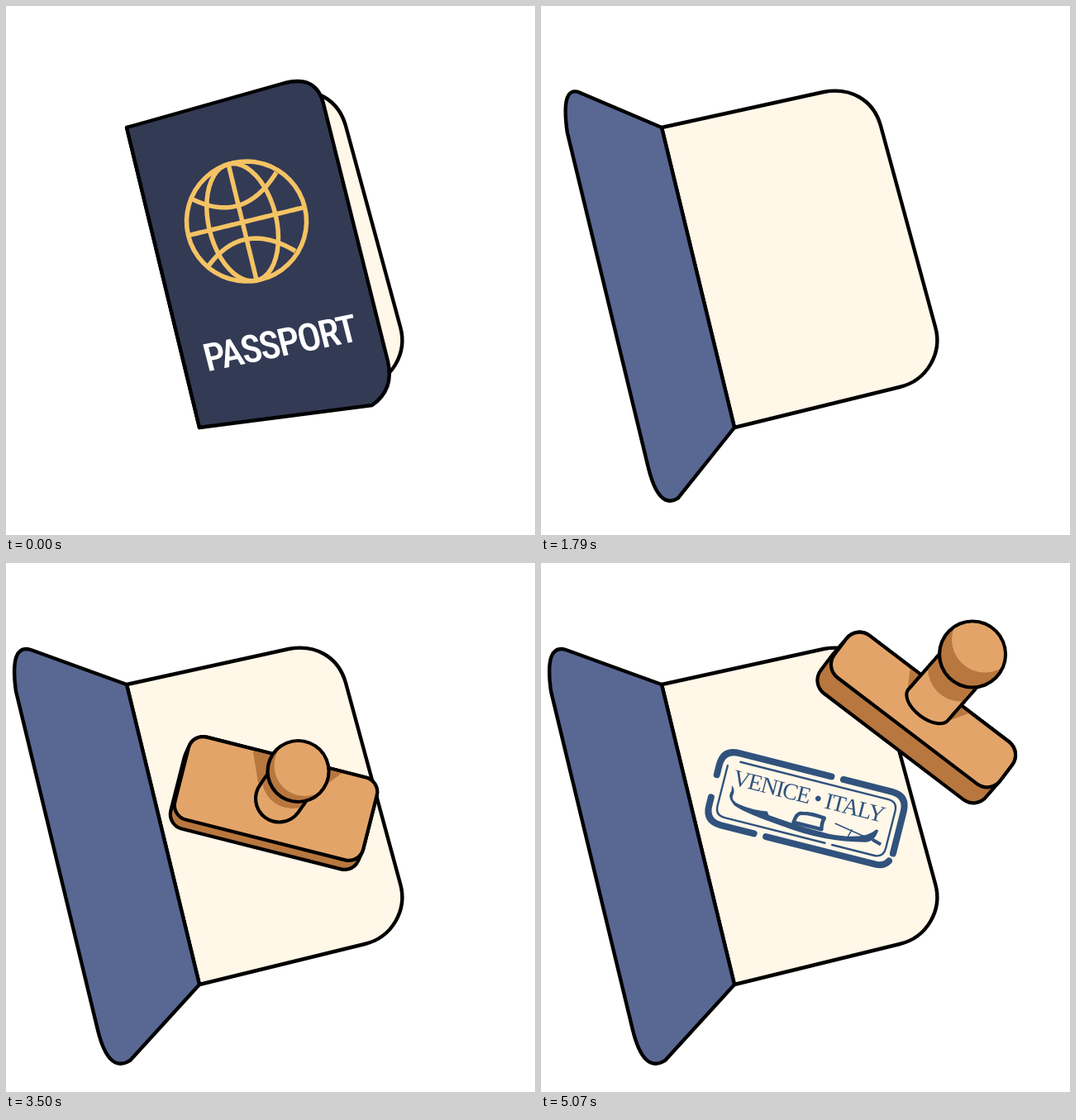
Write an HTML page with a canvas that moves like this. It is 640x640 px and loops after 7.21 s.

```html
<!DOCTYPE html>
<html lang="en">
<head>
<meta charset="utf-8">
<title>Passport stamp</title>
<style>
  html, body { margin: 0; width: 100%; height: 100%; overflow: hidden; background: #fff; }
  canvas { display: block; width: 100vw; height: 100vh; }
</style>
</head>
<body>
<canvas id="stage" width="640" height="640"></canvas>
<script>
const LOOP = 7210, FPS = 14;
const NAVY = '#333a54', INSIDE = '#596793', PAPER = '#fff7e8', GOLD = '#f4c363';
const WOOD = '#e3a469', SHADE = '#b8773e', INK = '#30527d';

const ctx = document.getElementById('stage').getContext('2d');
const layer = document.createElement('canvas');
layer.width = layer.height = 640;
const sc = layer.getContext('2d');

const mix = (a, b, k) => a + (b - a) * k;
const mix2 = (a, b, k) => [mix(a[0], b[0], k), mix(a[1], b[1], k)];
const unit = x => Math.min(1, Math.max(0, x));

function fill(c, path, color) {
  c.fillStyle = color;
  c.fill(path);
}

function clipped(c, path, draw) {
  c.save();
  c.clip(path);
  draw();
  c.restore();
}

// ---- Passport ----

const page = new Path2D('M146 147L342 104C374 98 402 113 411 145L477 388C486 420 467 453 434 461L234 510Z');

// Cover outline points, shut and open
const SHUT = [[334, 94], [375, 82], [384, 118], [462, 430], [470, 464], [443, 483]];
const OPEN = [[30, 105], [4, 97], [12, 155], [111, 565], [124, 618], [150, 602]];

function coverPath(p) {
  const [a, b, c, d, e, f] = SHUT.map((s, i) => mix2(s, OPEN[i], p));
  const path = new Path2D();
  path.moveTo(146, 147);
  path.lineTo(...a);
  path.quadraticCurveTo(...b, ...c);
  path.lineTo(...d);
  path.quadraticCurveTo(...e, ...f);
  path.lineTo(234, 510);
  path.closePath();
  return path;
}

// Carries a point of the shut cover along with the turning cover
function turn(x, y, p) {
  const dx = x - 146, dy = y - 147, len = 373.5;
  const v = (dx * 88 + dy * 363) / (len * len);
  const u = (dx * 363 - dy * 88) / len / 240;
  return [x + p * u * mix(-372, -348, v), y + p * u * mix(22, 145, v)];
}

function globeCurve(p, from, to, fn) {
  ctx.beginPath();
  for (let i = 0; i <= 48; i++) {
    const [x, y] = fn(mix(from, to, i / 48));
    ctx.lineTo(...turn(291 + x * 0.972 + y * 0.236, 260.5 - x * 0.236 + y * 0.972, p));
  }
  ctx.stroke();
}

function drawGlobe(p) {
  const R = 72.5, axis = -5;
  ctx.strokeStyle = GOLD;
  ctx.lineWidth = 5.5 - 4 * p;
  globeCurve(p, 0, 2 * Math.PI, a => [R * Math.cos(a), R * Math.sin(a)]);
  globeCurve(p, 0, 2 * Math.PI, a => [axis + 41 * Math.cos(a), R * Math.sin(a)]);
  globeCurve(p, -R, R, x => [x, 0]);
  globeCurve(p, -R, R, y => [axis, y]);
  for (const s of [-1, 1]) {
    globeCurve(p, -1, 1, x => [axis + 54 * x, s * (21 + 3 * x + 25 * x * x)]);
  }
}

function drawTitle(p) {
  const o = turn(331, 407.5, p);
  const ex = turn(331.98, 407.3, p), ey = turn(331.246, 408.47, p);
  const font = size => `500 extra-condensed ${size}px "Roboto Condensed", "Open Sans Condensed", Roboto, sans-serif`;
  ctx.save();
  ctx.transform(ex[0] - o[0], ex[1] - o[1], ey[0] - o[0], ey[1] - o[1], ...o);
  ctx.letterSpacing = '-2px';
  ctx.font = font(50);
  const size = Math.min(57, 50 * 188 / ctx.measureText('PASSPORT').width);
  ctx.font = font(size);
  ctx.textAlign = 'center';
  ctx.fillStyle = '#fff';
  ctx.fillText('PASSPORT', 0, size * 0.355);
  ctx.restore();
}

function outline(path, color) {
  fill(ctx, path, color);
  ctx.strokeStyle = '#000';
  ctx.lineWidth = 4.4;
  ctx.stroke(path);
}

function drawCover(p) {
  const path = coverPath(p), front = p < 0.65;
  outline(path, front ? NAVY : INSIDE);
  if (front) clipped(ctx, path, () => { drawGlobe(p); drawTitle(p); });
}

// ---- Ink print ----

const frame = new Path2D(
  'M-115 -13V-25Q-115 -45 -95 -45H20M35 -45H95Q115 -45 115 -25V27' +
  'M112.5 37Q108 45 98 45H-39M-54 45H-95Q-115 45 -115 25V15');
const thinFrame = new Path2D(
  'M-91 -35H93Q105 -35 105 -23V23Q105 35 93 35H41M32 35H-93Q-105 35 -105 23V-27');
const hullShape = new Path2D(
  'M-94 -5Q-88 0 -90 7Q-91 13 -80 15Q-62 18 -45 15L-42 19Q10 24 35 23' +
  'Q78 20 88 4L91 4Q90 19 79 22Q30 34 -20 28Q-70 24 -85 18Q-97 10 -93 2Z');
const cabin = new Path2D('M-11 20Q-10 8 -4 7Q8 4 24 6Q22 12 24 20Z');
const oar = new Path2D('M38 9L96 19M60 11L57 21');
const blade = new Path2D('M87 17L98 20');

function inkLine(path, width) {
  ctx.lineWidth = width;
  ctx.stroke(path);
}

function drawPrint() {
  ctx.save();
  ctx.translate(321, 297);
  ctx.rotate(0.248);
  ctx.strokeStyle = ctx.fillStyle = INK;
  ctx.lineCap = 'round';
  inkLine(frame, 8);
  inkLine(thinFrame, 2.4);
  ctx.font = '28px "Liberation Serif", "Noto Serif", serif';
  ctx.letterSpacing = '-1.3px';
  ctx.textAlign = 'center';
  ctx.fillText('VENICE • ITALY', -1, -6);
  ctx.fill(hullShape);
  ctx.lineCap = 'butt';
  inkLine(cabin, 4.5);
  inkLine(oar, 1.5);
  inkLine(blade, 4);
  ctx.restore();
}

// ---- Stamp ----

// The area a shape covers while it slides by (dx, dy)
function sweep(shape, dx, dy) {
  const path = new Path2D(), n = 24;
  for (let i = 0; i <= n; i++) {
    path.addPath(shape, new DOMMatrix().translate(dx * i / n, dy * i / n));
  }
  return path;
}

function oval([x, y], rx, ry, angle) {
  const path = new Path2D();
  path.ellipse(x, y, rx, ry, angle, 0, 2 * Math.PI);
  return path;
}

function plate([x, y], w, h, r, angle) {
  const flat = new Path2D(), path = new Path2D();
  flat.roundRect(-w, -h, 2 * w, 2 * h, r);
  path.addPath(flat, new DOMMatrix().translate(x, y).rotate(angle * 180 / Math.PI));
  return path;
}

// Fills the shape in black, then a slightly smaller one in color
function solid(make, color) {
  fill(sc, make(2.1), '#000');
  const inner = make(-2.1);
  fill(sc, inner, color);
  return inner;
}

// f = 0: raised at the side, f = 1: pressed on the page
function drawStamp(f, alpha) {
  const angle = mix(0.651, 0.248, f);
  const mid = mix2([462.5, 177.5], [326.5, 285], f);
  const drop = mix2([-16.5, 19], [-5, 11], f);
  const w = mix(126, 117.5, f), h = mix(32, 51.5, f), r = mix(20, 18, f);
  const foot = mix2([468.5, 171.5], [330.5, 285], f);
  const ball = mix2([522, 110.5], [353.5, 252], f);
  ball[0] -= 17 * f * (1 - f);
  const R = mix(40, 37, f);

  sc.clearRect(0, 0, 640, 640);
  const top = g => plate(mid, w + g, h + g, r + g, angle);
  solid(g => sweep(top(g), ...drop), SHADE);

  const face = solid(top, WOOD);
  clipped(sc, face, () => {
    const cast = new Path2D();
    cast.moveTo(...mix2([447, 124], [298, 222], f));
    cast.lineTo(...mix2([443, 158], [305, 266], f));
    cast.lineTo(...mix2([490, 192], [357, 291], f));
    cast.lineTo(...mix2([520, 181], [412, 250], f));
    fill(sc, cast, SHADE);
  });

  const rx = mix(30.5, 28.5, f), ry = mix(16.5, 28.5, f);
  const dx = (ball[0] - foot[0]) * 0.9, dy = (ball[1] - foot[1]) * 0.9;
  const neck = solid(g => sweep(oval(foot, rx + g, ry + g, angle), dx, dy), WOOD);
  const below = mix2([-14, 17], [-7, 8], f);
  clipped(sc, neck, () => fill(sc, oval([ball[0] + below[0], ball[1] + below[1]], R, R, 0), SHADE));

  const knob = solid(g => oval(ball, R + g, R + g, 0), SHADE);
  const glow = mix2([15, -18], [8, -7], f);
  clipped(sc, knob, () => fill(sc, oval([ball[0] + glow[0], ball[1] + glow[1]], R, R, 0), WOOD));

  ctx.globalAlpha = alpha;
  ctx.drawImage(layer, 0, 0);
  ctx.globalAlpha = 1;
}

// ---- Timeline, k counts steps of 1/14 s ----

const opening = k => 1 - Math.pow(1 - unit((k - 7) / 28), 2.85);

function press(k) {
  if (k <= 54) return Math.pow(unit((k - 35) / 14), 1.9);
  const u = unit((k - 54) / 17);
  return Math.pow(1 - u, 2.9 - u);
}

function render(ms) {
  const k = Math.floor((ms + 5) * FPS / 1000);
  ctx.fillStyle = '#fff';
  ctx.fillRect(0, 0, 640, 640);
  ctx.lineJoin = 'round';
  outline(page, PAPER);
  drawCover(opening(k));
  if (k >= 50) drawPrint();
  const alpha = unit((k - 28) / 5);
  if (alpha > 0) drawStamp(press(k), alpha);
}

const start = performance.now();
function tick() {
  render((performance.now() - start) % LOOP);
  requestAnimationFrame(tick);
}
tick();
</script>
</body>
</html>
```
